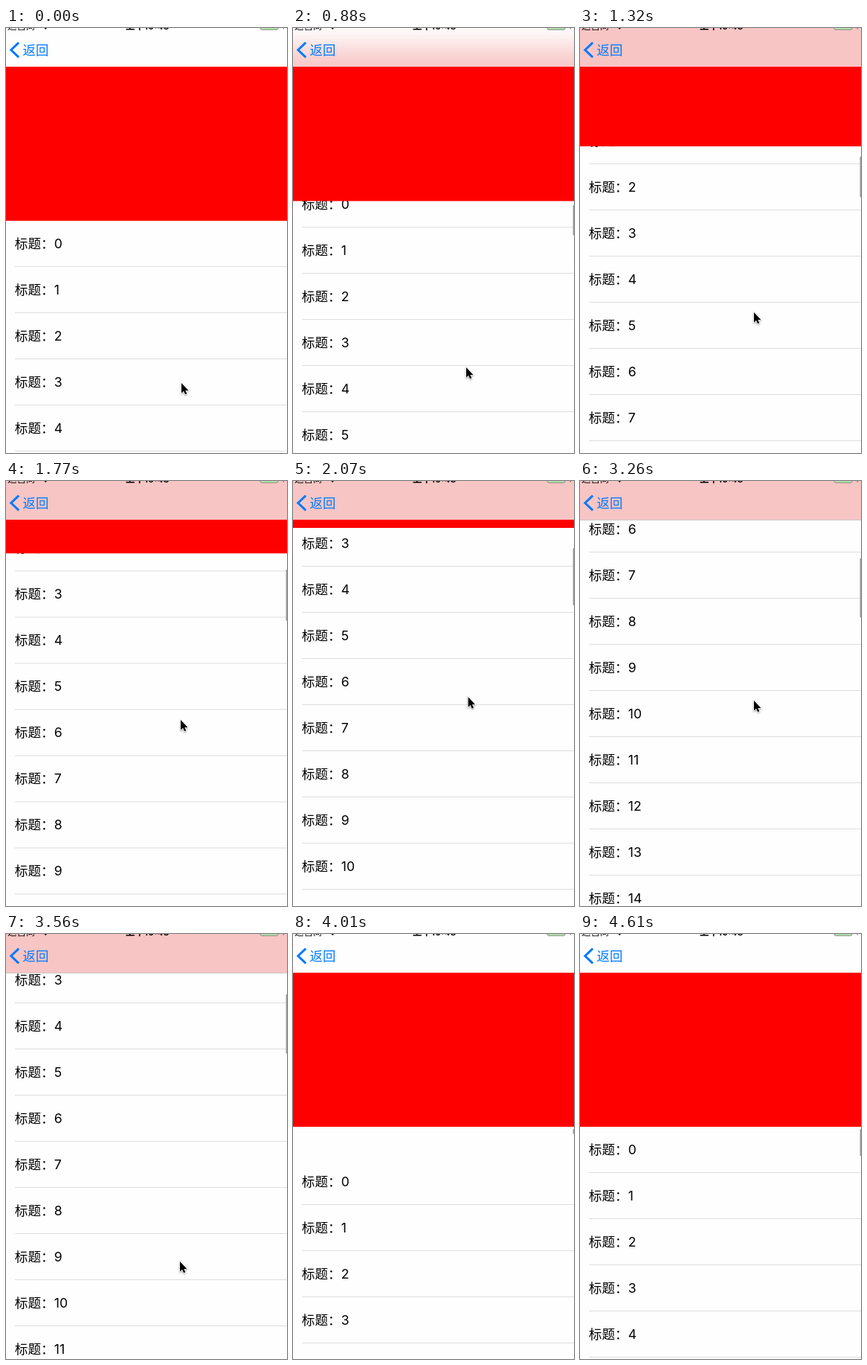
Recreate the animation shown at these times as an HTML page. Size 378 by 571 pixels, loop 4.71 s.

```html
<!DOCTYPE html>
<html lang="zh-CN">
<head>
<meta charset="utf-8">
<style>
  html, body { margin: 0; width: 100%; height: 100%; overflow: hidden; background: #fefefe; }
  svg { display: block; }
  #stage { width: 100%; height: 100%; }
  text { font-family: Inter, "Noto Sans CJK SC", "Noto Sans CJK", sans-serif; white-space: pre; }
  #rows text { font-size: 17.6px; }
  .status { font-size: 12.4px; }
</style>
</head>
<body>
<svg id="stage" viewBox="0 0 378 571">
  <rect width="378" height="571" fill="#fefefe"/>
  <g id="rows"></g>
  <rect y="52" width="378" height=".7" fill="#000" opacity=".3"/>
  <rect id="header" y="52" width="378" height="207" fill="#f00"/>
  <rect id="thumb" x="376.6" width="2.6" rx="1.3" fill="#999"/>

  <svg width="378" height="52" overflow="hidden">
    <rect width="378" height="52" fill="#fefefe"/>
    <rect id="tint" x="-80" width="540" height="300" fill="#f8c5c5"/>
    <g class="status">
      <text x="2" y="2" class="status">运营商</text>
      <path d="M50-1.5h6.5L53.2 2z"/>
      <text x="161" y="2" class="status" font-weight="600">上午10:48</text>
      <rect x="342" y="-8" width="24" height="10.3" rx="2" fill="#b5e3ae" stroke="#777" stroke-width=".8"/>
      <path d="M374-2l-1 3.5" stroke="#555"/>
    </g>
    <path d="M17.2 19.6 6.8 29.5 17.2 39.4" fill="none" stroke="#007aff" stroke-width="3"/>
    <text x="22.6" y="35.8" font-size="17.4" fill="#007aff">返回</text>
  </svg>

  <g id="cursor">
    <path d="M0 0V13.4L3 10.7 5.1 15.3 7.3 14.3 5.3 9.9H9.4Z" fill="#000" stroke="#fff"
          stroke-width="1.4" paint-order="stroke" style="filter:drop-shadow(0 1px 1px #0006)"/>
  </g>
</svg>
<script>
  const LOOP = 4710, ROW = 62, BAR = 52, HEADER = 207;
  const VIEW_BOTTOM = 690, CONTENT = 5050;

  const scroll = [
    0, 2, 6, 12, 21, 34, 53, 100, 152, 200, 245, 286, 323.5, 362, 392, 412,
    424, 433.5, 452, 492, 536, 575, 597, 562, 414, 180, 8, -43, -24, -9, -1, 0];
  // Pointer position: step, x, y. It leaves through the bottom edge.
  const pointer = [
    [0, 236, 477], [3, 235, 471], [6, 233, 456], [9, 234, 382], [12, 235, 321],
    [15, 236, 275], [17, 237, 258], [19, 236, 218], [20, 235, 222], [22, 234, 295],
    [23, 234, 335], [24, 234, 440], [25, 234, 600]];
  const shortSteps = [3, 6, 9, 20];
  const starts = scroll.map((_, i) => 150 * i - 10 * shortSteps.filter(n => n <= i).length);

  const $ = id => document.getElementById(id);
  const set = (el, attrs) => { for (const k in attrs) el.setAttribute(k, attrs[k]); };

  $('rows').innerHTML = Array.from({ length: 20 }, (_, i) => {
    const y = 259 + i * ROW;
    return `<text x="11.8" y="${y + 36.5}">标题：<tspan x="64.8">${i}</tspan></text>
      <rect x="12" y="${y + 61}" width="366" height="1" fill="#dedee0"/>`;
  }).join('');

  function pointerAt(step) {
    const n = pointer.findIndex(p => p[0] >= step);
    if (n < 0) return [234, 600];
    const b = pointer[n], a = pointer[Math.max(0, n - 1)];
    const f = b === a ? 0 : (step - a[0]) / (b[0] - a[0]);
    return [1, 2].map(k => a[k] + (b[k] - a[k]) * f);
  }

  function drawThumb(step, s, listTop) {
    const view = VIEW_BOTTOM - listTop, offset = listTop - 259 + s;
    const track = view - 6, full = track * view / CONTENT;
    const height = Math.max(7, full + Math.min(0, offset));
    const y = listTop + 3 + Math.max(0, offset) / (CONTENT - view) * (track - height);
    set($('thumb'), { y, height, opacity: step ? 1 : 0 });
  }

  function draw(step) {
    const s = scroll[step];
    const drag = Math.min(HEADER, Math.max(0, s / 2)); // header moves at half speed
    const top = BAR - drag;
    set($('rows'), { transform: `translate(0 ${-s})` });
    set($('header'), { y: top });
    set($('tint'), { y: top });
    const blur = Math.max(0, Math.min(18, .7 * drag, .7 * (80 - drag)));
    $('tint').style.filter = blur ? `blur(${blur}px)` : 'none';
    drawThumb(step, s, top + HEADER);
    set($('cursor'), { transform: `translate(${pointerAt(step)})` });
  }

  const origin = performance.now();
  let shown = -1;
  function tick() {
    const t = (performance.now() - origin) % LOOP;
    const step = starts.findLastIndex(start => start <= t);
    if (step !== shown) draw(shown = step);
    requestAnimationFrame(tick);
  }
  tick();
</script>
</body>
</html>
```
